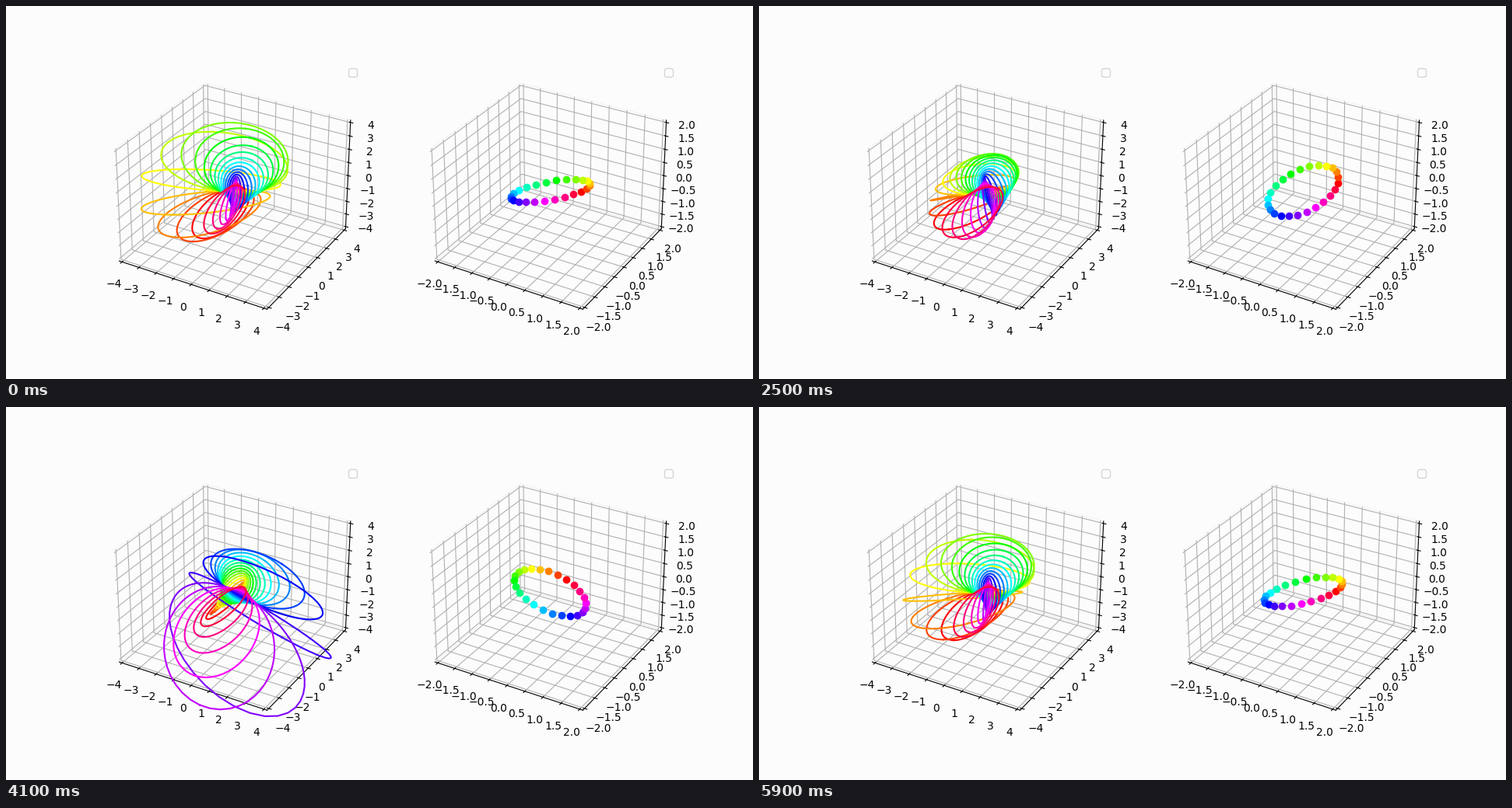
Recreate the animation shown at these times as a matplotlib script. Size 960x480 px, loop 6000 ms.

```python
import colorsys

import matplotlib.pyplot as plt
import numpy as np
from matplotlib.animation import FuncAnimation

FRAMES = 60
COUNT = 24
BACK = "#fcfcfc"

plt.rcParams.update({
    "font.family": "DejaVu Sans",
    "figure.facecolor": BACK,
    "axes.facecolor": BACK,
})

phi = np.arange(COUNT) * 2 * np.pi / COUNT
turn = np.linspace(0, 2 * np.pi, 240)
colors = [colorsys.hsv_to_rgb(i / COUNT, 1, 1) for i in range(COUNT)]


def great_circle(angle):
    """Points of the unit circle whose normal has turned by angle."""
    start = np.array([1, -1, -1]) / np.sqrt(3)
    side = np.array([-1, 0, -1]) / np.sqrt(2)
    n = start * np.cos(angle) + side * np.sin(angle)
    n *= np.sign(n[0])
    b = np.array([-n[2], 0, n[0]]) / np.hypot(n[0], n[2])
    a = np.array([0, 1, 0]) - n[1] * n
    a /= np.linalg.norm(a)
    return np.outer(np.cos(phi), a) + np.outer(np.sin(phi), b)


def fiber(point):
    """Hopf fiber over a point of the sphere, projected to space."""
    px, py, pz = point
    r1 = np.sqrt((1 + px) / 2)
    r2 = np.sqrt((1 - px) / 2)
    psi = np.arctan2(pz, -py)
    depth = 1 - r1 * np.cos(turn)
    return (r1 * np.sin(turn) / depth,
            r2 * np.cos(psi - turn) / depth,
            r2 * np.sin(psi - turn) / depth)


def make_axes(fig, place, limit):
    ax = fig.add_subplot(1, 2, place, projection="3d")
    edge = limit * 25 / 24  # small margin around the outer ticks
    ax.set(xlim=(-edge, edge), ylim=(-edge, edge), zlim=(-edge, edge))
    for axis in (ax.xaxis, ax.yaxis, ax.zaxis):
        axis.set_ticks(np.linspace(-limit, limit, 9))
        axis.pane.set(facecolor="none", edgecolor="#eeeeee")
    ax.legend([], [], loc="upper right")
    return ax


fig = plt.figure(figsize=(9.6, 4.8), dpi=100)
space = make_axes(fig, 1, 4)
sphere = make_axes(fig, 2, 2)
space.set_autoscale_on(False)
sphere.set_autoscale_on(False)
loops = [space.plot([], [], [], color=c)[0] for c in colors]
dots = [sphere.plot([], [], [], "o", color=c)[0] for c in colors]


def update(frame):
    points = great_circle(2 * np.pi * frame / FRAMES)
    for point, loop, dot in zip(points, loops, dots):
        loop.set_data_3d(*fiber(point))
        dot.set_data_3d(*point[:, None])
    return loops + dots


anim = FuncAnimation(fig, update, frames=FRAMES, interval=100,
                     repeat=True, repeat_delay=0, blit=False)
plt.show()
```
